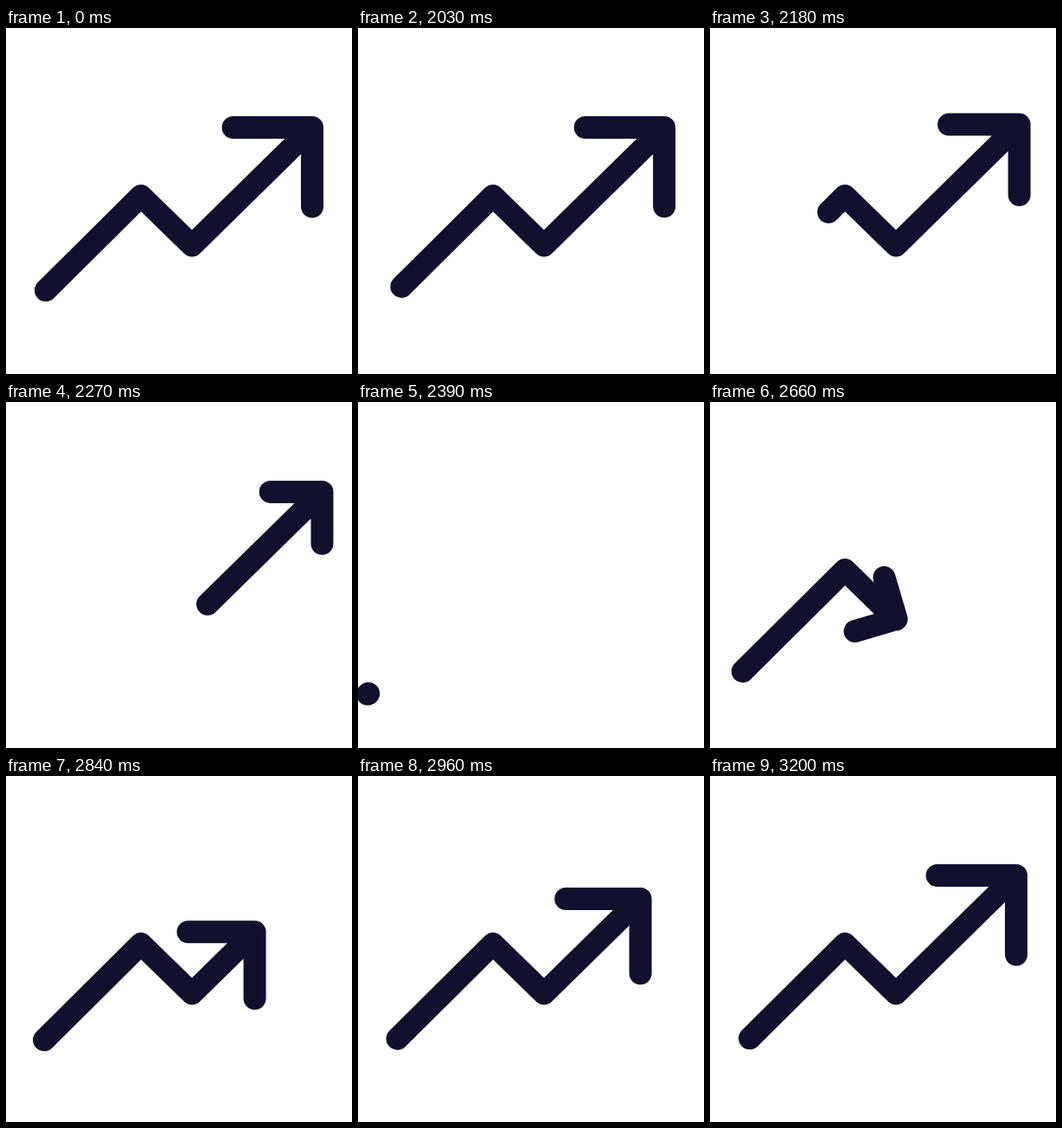
Animation, 400 px wide and 400 px high, one loop 3.26 s. Source, as an HTML page:

```html
<!DOCTYPE html>
<html lang="en">
<head>
<meta charset="utf-8">
<title>Trend arrow</title>
<style>
  html, body { margin: 0; height: 100%; overflow: hidden; background: #fff; }
  svg { display: block; width: 100%; height: 100%; }
  path { fill: none; stroke: #11112e; stroke-width: 26; stroke-linecap: round; stroke-linejoin: round; }
</style>
</head>
<body>
<svg viewBox="0 0 400 400"><path id="arrow"/></svg>
<script>
const LOOP = 3260, LEAVE = 1990, ENTER = 2391, SETTLED = 3190;
const route = [[11, 338], [156, 194], [215, 251.5], [354, 115], [387, 83]];
const reach = [0];
for (let i = 1; i < route.length; i++) {
  reach[i] = reach[i - 1] + Math.hypot(route[i][0] - route[i - 1][0], route[i][1] - route[i - 1][1]);
}
const END = reach[4], REST_TIP = reach[3], REST_TAIL = 49.3, REST_ARM = 91.5;

// Entry keys: [time, value]
const tipKeys = [[2390, 0], [2510, 187.5], [2660, 287], [2840, 388], [3080, 476], [SETTLED, REST_TIP]];
const armKeys = [[2390, 0], [2510, 39], [2660, 50], [2840, 77], [3080, 91], [SETTLED, REST_ARM]];
const turnKeys = [[2490, 0], [2510, 2], [2605, 90], [2660, 74], [2770, 0]];

const mix = (a, b, f) => a + (b - a) * f;

// Monotone cubic interpolation through the keys
function curve(keys, t) {
  const last = keys.length - 1;
  if (t <= keys[0][0]) return keys[0][1];
  if (t >= keys[last][0]) return keys[last][1];
  const slope = i => (keys[i + 1][1] - keys[i][1]) / (keys[i + 1][0] - keys[i][0]);
  const tangent = i => {
    if (i === 0) return slope(0);
    if (i === last) return 0;
    const a = slope(i - 1), b = slope(i);
    return a * b > 0 ? 2 * a * b / (a + b) : 0;
  };
  const i = keys.findIndex(k => k[0] > t) - 1;
  const [t0, v0] = keys[i], [t1, v1] = keys[i + 1];
  const d = t1 - t0, u = (t - t0) / d, w = 1 - u;
  return w * w * (1 + 2 * u) * v0 + u * u * (3 - 2 * u) * v1
    + u * w * d * (w * tangent(i) - u * tangent(i + 1));
}

function pointAt(dist) {
  let i = 1;
  while (i < 4 && reach[i] < dist) i++;
  const f = (dist - reach[i - 1]) / (reach[i] - reach[i - 1]);
  return [0, 1].map(k => mix(route[i - 1][k], route[i][k], f));
}

function pose(t) {
  if (t < LEAVE) return { tail: REST_TAIL, tip: REST_TIP, arm: REST_ARM, turn: 0 };
  if (t < ENTER) {
    const u = Math.min(1, (t - LEAVE) / 400);
    return {
      tail: mix(REST_TAIL, END, 1 - Math.cos(u * Math.PI / 2)),
      tip: mix(REST_TIP, END, u ** 3),
      arm: REST_ARM * (1 - u ** 3),
      turn: 0
    };
  }
  const u = Math.min(1, (t - 2390) / 800);
  return {
    tail: REST_TAIL * (1 - (1 - u) ** 3.5),
    tip: curve(tipKeys, t),
    arm: curve(armKeys, t),
    turn: curve(turnKeys, t) * Math.PI / 180
  };
}

const arrow = document.getElementById('arrow');

function draw(now) {
  const { tail, tip, arm, turn } = pose(now % LOOP);
  const [x, y] = pointAt(tip);
  const dx = arm * Math.cos(turn), dy = arm * Math.sin(turn);
  const corners = route.filter((_, i) => reach[i] > tail && reach[i] < tip);
  const shaft = [pointAt(Math.min(tail, tip)), ...corners, [x, y]];
  const head = [[x - dx, y - dy], [x, y], [x - dy, y + dx]];
  arrow.setAttribute('d', `M${shaft.join('L')}M${head.join('L')}`);
}

const start = performance.now();
function tick() {
  draw(performance.now() - start);
  requestAnimationFrame(tick);
}
tick();
</script>
</body>
</html>
```
